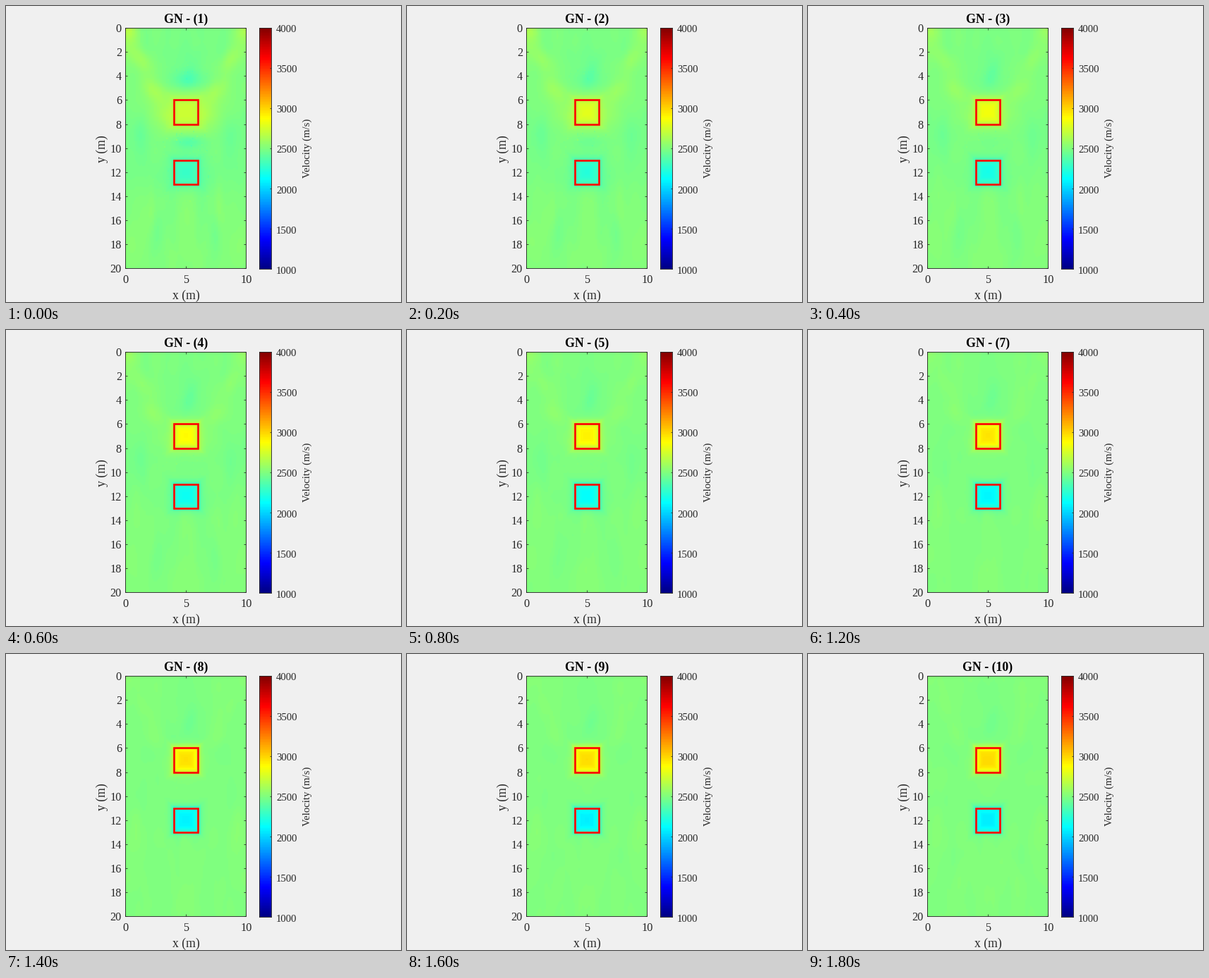
Recreate the animation shown at these times as a matplotlib script. Size 560 px wide and 420 px high, loop 2 s.

```python
import numpy as np
import matplotlib.pyplot as plt
from matplotlib.animation import FuncAnimation
from matplotlib.colors import ListedColormap
from matplotlib.patches import Rectangle

W, H, DPI = 560, 420, 100
FRAMES, INTERVAL = 10, 200
INK = "#262626"
plt.rcParams["font.family"] = "Liberation Serif"


def px(n):
    """Pixels to points."""
    return n * 72 / DPI


def pixel_axes(left, top, right, bottom):
    return fig.add_axes([left / W, 1 - bottom / H,
                         (right - left) / W, (bottom - top) / H])


def label(x, y, text, size, ha="center", va="center", **kw):
    return fig.text(x / W, 1 - y / H, text, fontsize=px(size),
                    ha=ha, va=va, **kw)


def jet(n=256):
    v = 4 * np.arange(1, n + 1) / n
    return ListedColormap(np.column_stack(
        [np.clip(1.5 - np.abs(v - c), 0, 1) for c in (3, 2, 1)]))


X, Y = np.meshgrid(np.arange(0.05, 10, 0.1), np.arange(0.05, 20, 0.1))


def bump(cx, cy, sx, sy):
    return np.exp(-((X - cx) / sx) ** 2 - ((Y - cy) / sy) ** 2)


def block(cy, soft):
    """Soft-edged 2 m square centred on x = 5."""
    d = np.maximum(np.abs(X - 5), np.abs(Y - cy))
    return 0.5 * (1 + np.tanh((1 - d) / soft))


def streaks(rng, count=110):
    """Vertically stretched texture, roughly mirrored about the middle."""
    out = np.zeros_like(X)
    for _ in range(count):
        cx, cy = rng.uniform(0, 5), rng.uniform(0, 20)
        sx, sy = rng.uniform(0.25, 0.7), rng.uniform(0.7, 2.2)
        amp = rng.normal()
        out += amp * bump(cx, cy, sx, sy)
        out += amp * bump(10 - cx + rng.normal(0, 0.2), cy, sx, sy)
    return out / out.std()


rng = np.random.default_rng(7)
TEX_A, TEX_B = streaks(rng), streaks(rng)
SPECKLE = rng.normal(size=X.shape) * (rng.random(X.shape) < 0.08)
SPECKLE *= bump(5, 3.8, 1.6, 0.8) + bump(5, 9, 2, 1.2) + bump(5, 12, 2.2, 2)

ARMS = (np.exp(-((X - 0.2 - 0.42 * Y) / 0.8) ** 2)
        + 0.85 * np.exp(-((X - 9.9 + 0.46 * Y) / 0.8) ** 2))
ARMS *= (0.75 + 0.25 * np.cos(2.4 * (Y - 5.3))) / (1 + np.exp((Y - 7.5) / 0.5))
CORNERS = bump(0, 0.5, 0.8, 2) + 0.7 * bump(10, 0.4, 0.6, 1.6)
HALO = bump(5.1, 7.2, 2.2, 1.7)
SHADOW = bump(5.2, 4.4, 1.5, 0.8)
VOIDS = (bump(5, 2, 2.4, 2.5) + bump(1.5, 10.5, 1.2, 2.6)
         + bump(8.5, 10.5, 1.2, 2.6))
WEDGE = bump(5.3 - 0.25 * (Y - 4), 4, 0.6, 1.4)
TAIL = bump(5.2, 15.5, 0.8, 2.8)
FLOOR = 1 / (1 + np.exp(14 - Y))


def velocity(k):
    slow, fast = np.exp(-k / 4.5), np.exp(-k / 1.1)
    growth = np.exp(-k / 3.5)
    soft = 0.32 + 0.25 * growth
    v = 2497 + (7 + 4 * slow) * (np.cos(0.25 * k) * TEX_A
                                 + np.sin(0.25 * k) * TEX_B)
    v += 105 * slow * ARMS + 70 * slow * CORNERS + 18 * TAIL
    v += slow * (10 * FLOOR - 38 * VOIDS)
    v += fast * (140 * HALO - 110 * SHADOW - 120 * bump(5.2, 9.5, 1.4, 0.6)
                 - 60 * bump(5.2, 12, 1.9, 1.7))
    v -= (35 + 45 * slow * (1 - fast)) * WEDGE
    v += 35 * np.exp(-k / 2.5) * SPECKLE
    up, down = block(7, soft), block(12, soft)
    v = v * (1 - up) + up * (2500 + 500 * (1 - 0.55 * growth))
    return v * (1 - down) + down * (2500 - 450 * (1 - 0.5 * growth))


fig = plt.figure(figsize=(W / DPI, H / DPI), dpi=DPI, facecolor="#f0f0f0")
cmap = jet()

ax = pixel_axes(169.4, 31, 340.4, 372.4)
image = ax.imshow(velocity(0), cmap=cmap, vmin=1000, vmax=4000, aspect="auto",
                  extent=(0, 10, 20, 0), interpolation="nearest")
for top in (6, 11):
    ax.add_patch(Rectangle((4, top), 2, 2, fill=False, ec="red", lw=px(2.67),
                           joinstyle="miter"))
ax.set_xticks([0, 5, 10])
ax.set_yticks(range(0, 21, 2))
ax.tick_params(direction="in", top=True, right=True, length=px(3.4),
               width=px(0.8), color=INK, labelcolor=INK, labelsize=px(16.3))
ax.tick_params(axis="x", pad=px(9))
ax.tick_params(axis="y", pad=px(5.5))

bar = pixel_axes(359.4, 31, 376.4, 373.4)
bar.imshow(np.arange(256)[:, None], cmap=cmap, aspect="auto", origin="lower",
           extent=(0, 1, 1000, 4000), interpolation="nearest")
bar.set_xticks([])
bar.set_yticks(range(1000, 4001, 500))
bar.yaxis.tick_right()
bar.tick_params(direction="in", length=px(2.5), width=px(0.8), color=INK,
                labelright=False)
for speed in range(1000, 4001, 500):
    label(383, 37 + 343 * (4000 - speed) / 3000, str(speed), 14.8,
          ha="left", va="baseline", color=INK)

for a in (ax, bar):
    for spine in a.spines.values():
        spine.set(linewidth=px(0.9), edgecolor=INK)

title = label(255, 19.5, "", 17.7, weight="bold", color="black")
label(255, 411.5, "x (m)", 17.6, color=INK)
label(136.5, 203, "y (m)", 17.6, color=INK, rotation=90)
label(427, 202, "Velocity (m/s)", 14.8, color=INK, rotation=90)


def update(k):
    image.set_data(velocity(k))
    title.set_text(f"GN - ({k + 1})")
    return image, title


anim = FuncAnimation(fig, update, frames=FRAMES, interval=INTERVAL,
                     repeat=True, repeat_delay=0)
plt.show()
```
